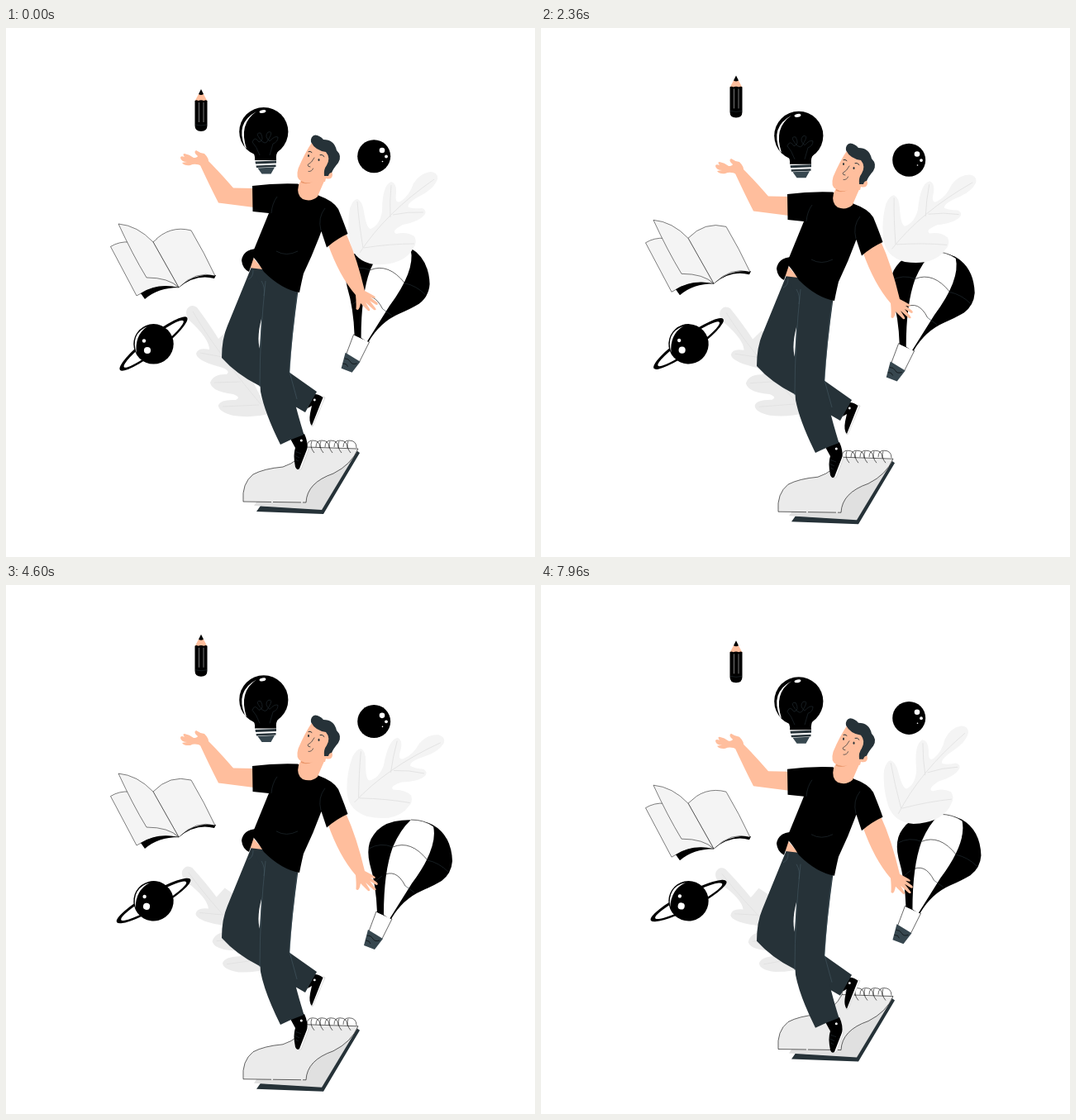
An HTML page for the animation above (8000 ms loop, 640 by 640 pixels).

```html
<!DOCTYPE html>
<html lang="en">
<head>
<meta charset="utf-8">
<title>Floating ideas</title>
<style>
  html, body { margin: 0; width: 100%; height: 100%; overflow: hidden; background: #fff; }
  svg { display: block; width: 100vw; height: 100vh; }
  .line { fill: none; stroke: #000; stroke-width: .6; }
  .seam { fill: none; stroke: #455a64; stroke-width: .6; }
  .faint { fill: none; stroke: #263238; stroke-width: .6; }
  .vein { fill: none; stroke: #e0e0e0; stroke-width: .8; }
  .page { fill: #f4f4f4; stroke: #000; stroke-width: .5; stroke-linejoin: round; }
  .skin { fill: #ffbe9d; }
  .dark { fill: #263238; }
  .white { fill: #fff; }
</style>
</head>
<body>
<svg viewBox="0 0 640 640">
  <g id="lowLeaf">
    <path fill="#ebebeb" d="M219 340Q224 333 231 338Q246 358 257 376L268 366L296 390L300 430L318 467Q298 472 275 469Q256 464 257 456Q260 449 278 450Q285 447 275 443Q249 440 247 429Q251 418 267 419Q272 415 262 411Q231 403 230 394Q232 386 246 389Q246 376 222 354Q216 346 219 340z"/>
    <path class="vein" d="M226 343Q252 388 308 455M235 393L262 398M252 429L284 428M262 458L306 456"/>
  </g>

  <g id="balloon">
    <path class="white" d="M448 395L467 404L455 428L439 419z"/>
    <path class="line" d="M448 395L439 419M467 404L455 428M448 395L467 404"/>
    <path fill="#37474f" d="M438 417L456 428L446 441L433 436z"/>
    <path class="line" d="M437 424q5 0 7 4t8 2M435 430q5 0 6 4"/>
    <path d="M449 396Q448 364 440 337Q435 315 445 302Q453 290 470 286Q495 281 516 290Q539 303 540 334Q539 349 527 358Q517 364 503 370Q480 380 466 404z"/>
    <path class="white" d="M490 284Q506 284 517 292Q523 318 491 361L464 404L457 399Q457 347 468 317Q477 296 490 284z"/>
    <path class="line" d="M490 284Q506 284 517 292M468 317Q490 308 510 333M455 352Q472 342 483 364"/>
    <path class="faint" d="M439 319Q453 311 468 317M510 333Q524 336 535 347M446 359L455 352M483 364L494 372"/>
  </g>

  <g id="highLeaf">
    <path fill="#f4f4f4" d="M445 286Q422 282 417 262Q412 240 416 218Q420 207 425 207Q431 209 433 222Q436 242 441 243Q452 239 455 222Q455 190 466 186Q473 188 472 200Q470 213 477 210Q488 203 493 188Q501 175 514 174Q523 175 522 183Q518 194 503 202Q484 212 487 217Q493 219 503 218Q509 220 507 225Q501 234 480 238Q465 246 472 249Q485 246 494 252Q498 260 493 266L490 271Q476 288 445 286z"/>
    <path class="vein" d="M428 272Q459 224 518 183M425 210Q427 236 432 266M466 190Q464 210 465 229M505 223Q486 222 468 226M494 261Q465 261 433 266"/>
  </g>

  <g id="pad">
    <path class="dark" d="M303 585L308 578L381 582L424 511L428 514L384 588z"/>
    <path fill="#e0e0e0" d="M300 578L304 572L426 510L382 583z"/>
    <path fill="#ebebeb" d="M287 573Q285 551 299 540Q312 533 335 531Q356 524 364 507L426 509Q418 528 396 539Q364 550 363 574z"/>
    <path class="line" d="M287 573Q285 551 299 540Q312 533 335 531Q356 524 364 507L426 509Q418 528 396 539Q364 550 363 574"/>
    <path class="line" stroke-dasharray="34 2" d="M287 573L363 574"/>
    <g id="rings"></g>
  </g>

  <g id="book">
    <path class="page" d="M126.500 264.500Q137 258 150 259L209 314Q180 309 158 324z"/>
    <path d="M163 321Q183 308 209 314Q184 314 168 328z"/>
    <path d="M209 314Q228 296 254 299L252 303Q230 297 209 314z"/>
    <path class="page" d="M178 259Q198 238 224 245Q240 272 253 300Q230 293 209 314z"/>
    <path class="page" d="M136 237Q159 239 178 259L209 314Q197 302 170 302Q153 274 136 237z"/>
  </g>

  <g id="planet">
    <g transform="rotate(-38 178.500 382)">
      <ellipse cx="178.500" cy="382" rx="51.500" ry="10"/>
      <ellipse class="white" cx="178.500" cy="382.300" rx="45.500" ry="7.200"/>
    </g>
    <circle cx="178.500" cy="382.300" r="24.200"/>
    <path class="white" d="M171 361Q150 370 158 394Q155 372 171 361z"/>
    <circle class="white" cx="171" cy="390" r="4.100"/>
    <circle class="white" cx="167" cy="378.500" r="2.200"/>
  </g>

  <g id="ball">
    <circle cx="445.200" cy="155.200" r="20"/>
    <circle class="white" cx="455" cy="148" r="3.300"/>
    <circle class="white" cx="460" cy="155.500" r="1.900"/>
    <circle class="white" cx="455.500" cy="161.500" r=".8"/>
  </g>

  <g id="pencil">
    <path class="skin" d="M228.500 88.500L233 80h6l4.500 8.500z"/>
    <path d="M236 74l3 6q-3 2-6 0z"/>
    <path d="M228.500 88q2-1.500 4 0q3.500-1.500 7 0q2-1.500 4 0v30q0 7-7.500 7t-7.500-7z"/>
    <path fill="none" stroke="#aaa" stroke-width=".7" d="M233.500 90v24M239 90v24"/>
    <path class="faint" d="M229 117q7 2 14 0"/>
  </g>

  <g id="bulb">
    <circle cx="311.800" cy="125.500" r="29.600"/>
    <path d="M296 148Q302 152 301 160H327Q326 152 330 148z"/>
    <path class="dark" d="M301.500 161.500L327 160.500V163.500L302 164.500zM302.500 166.500L326.500 165.500V168L303 169z"/>
    <path fill="#37474f" d="M304.500 169.500L325 168.500L320.500 176.500H309.500z"/>
    <path class="white" d="M303 101Q277 115 289 144L291 146Q281 116 303 101z"/>
    <ellipse class="white" cx="310.500" cy="101" rx="4" ry="1.900" transform="rotate(-10 310.500 101)"/>
    <path class="faint" d="M307 154Q303 143 298 138Q301 130 306 138Q313 136 308 127Q301 126 307 134Q314 144 318 134Q324 124 317 126Q312 131 319 137Q325 130 329 132Q329 138 323 140L319 154"/>
  </g>

  <g id="man">
    <path class="white" stroke="#bbb" stroke-width=".5" d="M383 446L386 447L371 482L369 481z"/>
    <path d="M369 444Q376 441 383.500 447L370 481Q366 477 368 466L370 457L365 460z"/>
    <circle class="white" cx="373.300" cy="450" r="1.400"/>
    <path class="dark" d="M297 289L268 360Q261 376 261 399Q279 419 305 432L362 465L376 440L342 416L309 394Q302 378 309 352L330 300z"/>
    <path class="white" stroke="#bbb" stroke-width=".5" d="M364 508L366 510L357 534L354 534z"/>
    <path d="M344 497L361 491Q366 502 364 510L355 533Q352 536 350 531Q347 516 350 508z"/>
    <circle class="white" cx="357.300" cy="499" r="1.500"/>
    <path class="faint" d="M349 512l8 3M349 517l6 3M350 522l4 2"/>
    <path class="dark" d="M296 288L309 289Q330 312 353.500 318Q346 372 343 417Q345 442 360.500 492Q346 497 332 504Q313 466 308 440Q305 405 308 370L311 318z"/>
    <path class="seam" d="M314 306Q307 370 307 434M293 304Q299 302 299 293M352 322Q345 375 343 416L352 449M309 306Q314 314 312 324"/>

    <path class="skin" d="M300 194L275 193.500Q259 175 244 160L234 164Q246 190 257 211.500L300 217z"/>
    <path class="skin" d="M237 167Q229 163 223 166Q216 167 213 163L219 162Q212 162 211 157Q211 154 216 156Q213 152 216 152Q222 153 227 157Q231 157 232 155Q226 150 230 148Q234 151 240 152Q246 158 245 163z"/>
    <path class="skin" d="M389 260Q403 300 423 323Q424 333 423.500 340Q427 344 429 333L438 342q3 1 2-2l-5-8 10 9q4 1 2-2l-7-9 8 5q3 0 1-3l-8-6 5 1q2-1-1-3Q440 321 434 318Q424 276 411 248z"/>
    <path class="skin" d="M298 277L311 292L294 290z"/>
    <path d="M303 267Q287 268 285 281Q286 291 294 295L299 280z"/>
    <path d="M298 191Q325 187.500 353 188.500L379 203Q396 209 402 219Q409 236 413.500 249Q400 255 388 265.500L381.500 246Q372 272 360 297Q358 305 355 320Q333 316 312 295Q304 282 299 277L300 268L318 224L298.500 222z"/>
    <path class="faint" d="M321 224Q322 212 328 204M381 245Q377 229 386 218M327 270Q339 277 353 270"/>

    <path class="skin" d="M358 182L354 190Q351 202 359 207Q369 211 377 204Q381 194 387 181z"/>
    <path fill="#eb996e" d="M357 184.500Q363 189 371 186Q364 190 357 187z"/>
    <path class="skin" d="M371 137Q361 152 353.500 170Q350 182 357 185Q364 188 374 185L386 186L387 182Q394 184 395 178Q395 172 390 173L393 148z"/>
    <path class="dark" d="M369 138Q368 131 374 129.500Q380 130 384 135Q397 135 400 148Q407 155 402 163Q396 170 394 175Q391 175 390 179L385 179Q384 171 388 166Q393 157 387 150Q374 148 369 138z"/>
    <g fill="none" stroke="#263238" stroke-linecap="round">
      <path d="M366 149.500q2-1 4 1M380 153.500q3-1 5 2" stroke-width="1"/>
      <path d="M373 157Q370 163 365 165.500Q365 168 368 168M366 173.500Q370 174 371.500 170" stroke-width=".7"/>
    </g>
    <ellipse class="dark" cx="366" cy="154.500" rx="1" ry="1.600"/>
    <ellipse class="dark" cx="378.500" cy="159.500" rx="1" ry="1.600"/>
  </g>
</svg>
<script>
const $ = id => document.getElementById(id);

$('rings').innerHTML = [0, 1, 2, 3, 4].map(i =>
  `<path class="line" d="M${364 + i * 11} 507q0-8 7-8q9 0 9 9M${370 + i * 11} 500q-3 7 3 14"/>`).join('');

// Smooth 0..1 over the given span, going back afterwards
const ease = (t, span) => (1 - Math.cos(Math.PI * t / span)) / 2;

// Climbs to 1 at the peak, then falls by depth at its own pace
const swing = (t, peak, rise, fall, depth = 1) =>
  t < peak ? ease(t - peak + rise, rise) : 1 - depth * ease(t - peak, fall);

const move = (id, x, y) => $(id).setAttribute('transform', `translate(${x} ${y})`);
const turn = (id, angle, x, y) => $(id).setAttribute('transform', `rotate(${angle} ${x} ${y})`);

function draw(now) {
  const t = now % 8000;
  const sink = ease(t, 6600), tilt = ease(t, 7200);
  const lift = swing(t, 5200, 5200, 7500), sway = swing(t, 4800, 5000, 4550, 2);
  move('man', 0, 35.3 * sink);
  move('bulb', 0, 17 * sink);
  move('pencil', 0, -20.7 * ease(t, 3340));
  move('ball', 0, 10 * swing(t, 5000, 5000, 6500));
  move('balloon', 28.3 * lift - 27.4, 25 * lift - 24.2);
  move('book', 0, -9 * sway);
  move('pad', 0, 25 * swing(t, 4900, 5000, 4700, 2));
  turn('highLeaf', 10 * sway, 477, 231);
  turn('lowLeaf', -7.5 * tilt, 272, 402);
  turn('planet', 11 * tilt, 178.5, 382.3);
  requestAnimationFrame(draw);
}
requestAnimationFrame(draw);
</script>
</body>
</html>
```
